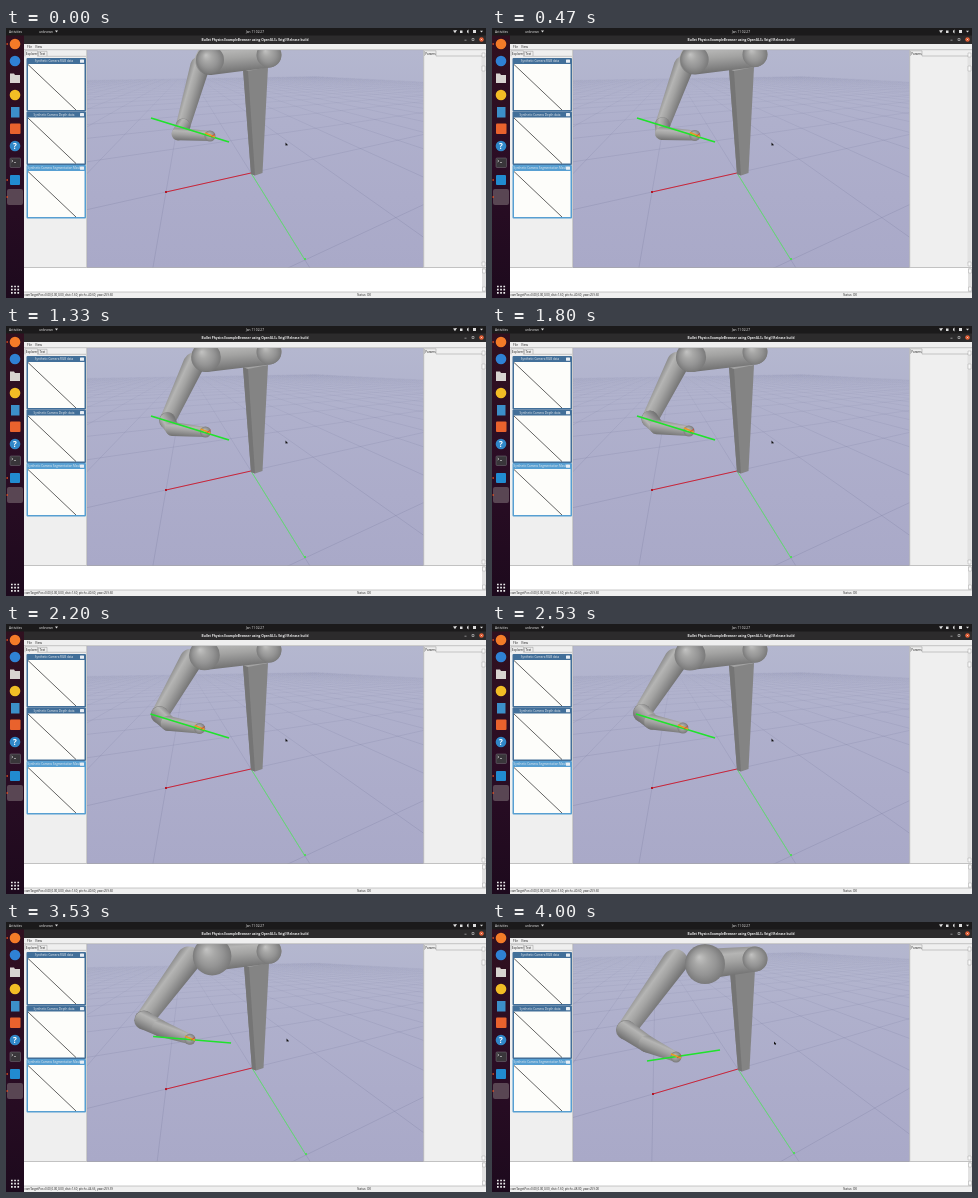
Animation, 480 px wide and 270 px high, one loop 4.07 s. Source, as an HTML page with a canvas:

```html
<!DOCTYPE html>
<html lang="en">
<head>
<meta charset="utf-8">
<title>Robot arm simulation</title>
<style>
  html, body { margin: 0; width: 100%; height: 100%; overflow: hidden; background: #efefef; }
  canvas, svg { position: absolute; left: 0; top: 0; width: 480px; height: 270px; }
  text { font: 3.2px "Open Sans", "Noto Sans", sans-serif; fill: #222; }
  .light text { fill: #eee; }
  .title { font-weight: 700; }
  .mid { text-anchor: middle; }
</style>
</head>
<body>
<canvas id="view" width="480" height="270"></canvas>
<svg viewBox="0 0 480 270">
  <!-- side panels, log and status bar -->
  <path fill="#efefef" d="M18 16H480V22H18zM18 22H81V240H18zM417.500 22H480V240H417.500zM18 264H480V270H18z"/>
  <path fill="#fff" d="M18 240H476V264H18z"/>
  <path fill="#e2e2e2" d="M476 240h4v24h-4zM475.500 27h4v209h-4z"/>
  <path fill="none" stroke="#a5a5a5" stroke-width=".6" d="M18 239.500H480M18 264H480M18 21.700H480M80.700 22V239M417.700 22V239M19 28.300V22.800H31.500V28.300H80M32.500 28V23.300H41V28M418.500 28V22.800H430V28H479"/>
  <path fill="#f8f8f8" stroke="#aaa" stroke-width=".5" d="M476 25h3v4h-3zM476 38h3v5h-3zM476 234h3v4h-3zM476.500 241h3v4h-3zM476.500 259h3v4h-3z"/>
  <text x="21" y="19.800">File</text>
  <text x="29" y="19.800">View</text>
  <text x="19.800" y="26.600" style="font-size:3px">Explorer</text>
  <text x="33.500" y="26.600" style="font-size:3px">Test</text>
  <text x="419.200" y="26.600" style="font-size:3px">Params</text>
  <text id="status" x="18.500" y="268.200" style="font-size:2.900px"></text>
  <text x="351" y="268.200" style="font-size:2.900px">Status: OK</text>

  <!-- camera windows -->
  <g id="cams" class="light"></g>

  <!-- desktop bars -->
  <path fill="#1b1a1b" d="M0 0H480V8H0z"/>
  <path fill="#2c2b2c" d="M18 7.500H480V16H18z"/>
  <g class="light">
    <text x="3" y="4.500">Activities</text>
    <text x="33" y="4.500">unknown</text>
    <path fill="#ddd" d="M49 2.600h3l-1.500 1.800z"/>
    <text class="mid" x="249" y="4.500">Jan 11 02:27</text>
    <text class="mid title" x="249" y="12.700">Bullet Physics ExampleBrowser using OpenGL3+ [btgl] Release build</text>
    <path fill="#ddd" d="M447 2.500l4-.5-2 3.200zM454 2.500h2.500v2.500h-2.500zM461 2.700l1.500-1.200v4l-1.500-1.200zM467 2h3v3h-3zM474 2.700h3l-1.500 1.800z"/>
    <path fill="none" stroke="#ccc" stroke-width=".6" d="M458.500 12.200h2M466 10.500h2v2h-2z"/>
    <circle cx="475.500" cy="11.500" r="2.300" fill="#e05a30"/>
    <path stroke="#fff" stroke-width=".5" d="M474.700 10.700l1.600 1.600M476.300 10.700l-1.600 1.600"/>
  </g>

  <!-- dock -->
  <path fill="url(#dockFill)" d="M0 7.500H18V270H0z"/>
  <defs>
    <linearGradient id="dockFill" x2="0" y2="1">
      <stop stop-color="#30101f"/><stop offset=".5" stop-color="#2b0d25"/><stop offset="1" stop-color="#1d0a1d"/>
    </linearGradient>
  </defs>
  <rect x="1" y="161" width="16" height="16" rx="2" fill="#594653"/>
  <circle cx="9" cy="16" r="5.300" fill="#f47b28"/>
  <circle cx="9" cy="33" r="5.300" fill="#2f81d4"/>
  <path fill="#d8d4d0" d="M4 45.500h4l1 1.500h5v8H4z"/>
  <circle cx="9" cy="67" r="5.300" fill="#f2bd25"/>
  <rect x="5" y="79" width="8.500" height="10.500" fill="#3c8fc9"/>
  <rect x="4" y="95.500" width="10.500" height="10.500" rx="1" fill="#e9622d"/>
  <circle cx="9" cy="118" r="5.300" fill="#3087c8"/>
  <text class="mid" x="9" y="121" style="font-size:8px;font-weight:700;fill:#fff">?</text>
  <rect x="4" y="130" width="10.500" height="9.500" rx="1" fill="#39363a" stroke="#77717a" stroke-width=".5"/>
  <path fill="none" stroke="#ddd" stroke-width=".6" d="M5.500 132l1.500 1-1.500 1M8 134.500h2"/>
  <rect x="4" y="147" width="10" height="10" rx="1" fill="#218bd0"/>
  <path fill="#e95420" d="M.5 15.300h1.400v1.400H.5zM.5 151.300h1.400v1.400H.5zM.5 168.300h1.400v1.400H.5z"/>
  <path stroke="#eee" stroke-width="1.700" stroke-dasharray="1.700 1.500" d="M5 258.500h8.200M5 261.700h8.200M5 264.900h8.200"/>
</svg>
<script>
const ctx = document.getElementById("view").getContext("2d");
const status = document.getElementById("status");
const LOOP = 4070, STEP = 200 / 3;

const titles = ["RGB data", "Depth data", "Segmentation Mask"];
document.getElementById("cams").innerHTML = titles.map((name, i) => {
  const y = 30 + i * 53.500, color = i == 2 ? "#579fd2" : "#426f99";
  return `<rect x="20.500" y="${y}" width="59.500" height="53.500" rx="1" fill="${color}"/>
    <rect x="22" y="${y + 6}" width="56.500" height="46" fill="#fdfdfa"/>
    <path d="M22 ${y + 6.500}L70 ${y + 52}" stroke="#222" stroke-width=".7"/>
    <text class="mid" x="48" y="${y + 4.200}" style="font-size:3px">Synthetic Camera ${name}</text>
    <rect x="74" y="${y + 1.500}" width="4" height="3.200" rx=".5" fill="#e8eef4"/>`;
}).join("");

// time, then x,y of: shoulder, forearm top, elbow, wrist, tool, marker start, marker end
const poses = [
  [0, 204, 32, 194, 38, 177, 98, 172, 106, 204, 108, 145, 90, 223, 114],
  [870, 201, 31, 190, 38, 165, 96, 168, 105, 202, 107, 145, 90, 223, 114],
  [1800, 199, 31, 186, 37, 158, 93, 165, 101, 197, 105, 145, 90, 223, 114],
  [2530, 198, 31, 184, 36, 150, 89, 160, 98, 191, 104, 144, 90, 223, 114],
  [3070, 198, 32, 183, 35, 144, 85, 157, 95, 188, 102, 143, 90, 223, 114],
  [3270, 199, 32, 183, 35, 142, 85, 156, 95, 187, 102, 143, 91, 223, 114],
  [3530, 206, 34, 183, 37, 138, 98, 154, 106, 184, 117, 147, 114, 225, 121],
  [3730, 213, 41, 183, 39, 136, 107, 155, 120, 184, 134, 155, 138, 228, 128],
  [4000, 213, 42, 183, 40, 134, 108, 155, 122, 184, 135, 155, 139, 228, 128]
];

// time, then x,y of: origin, red end, green end; horizon, pillar top, pitch, yaw, pointer x,y
const cameras = [
  [3270, 245, 145, 160, 164, 299, 232, 42, 39, -40.6, 259.6, 279.5, 114.5],
  [3530, 246, 146, 160, 167, 300, 233, 34, 41, -44.6, 259.4, 280.5, 116.5],
  [3730, 246, 147, 161, 172, 302, 232, 22, 47, -48, 259, 282, 119.5]
];

function sample(keys, t) {
  const last = keys[keys.length - 1];
  if (t <= keys[0][0]) return keys[0].slice(1);
  if (t >= last[0]) return last.slice(1);
  const i = keys.findIndex(k => k[0] > t), a = keys[i - 1], b = keys[i];
  const f = (t - a[0]) / (b[0] - a[0]);
  return a.slice(1).map((v, j) => v + (b[j + 1] - v) * f);
}

const pairs = (list, n) => Array.from({ length: n }, (_, i) => [list[2 * i], list[2 * i + 1]]);

function shade(gradient, ...colors) {
  colors.forEach((c, i) => gradient.addColorStop(i / (colors.length - 1), c));
  return gradient;
}

function line(a, b, color, width) {
  ctx.beginPath();
  ctx.moveTo(...a);
  ctx.lineTo(...b);
  ctx.strokeStyle = color;
  ctx.lineWidth = width;
  ctx.stroke();
}

function poly(points, color) {
  ctx.beginPath();
  points.forEach(p => ctx.lineTo(...p));
  ctx.fillStyle = color;
  ctx.fill();
}

function tube(a, b, ra, rb) {
  const angle = Math.atan2(b[1] - a[1], b[0] - a[0]), q = Math.PI / 2;
  let nx = -Math.sin(angle), ny = Math.cos(angle);
  if (nx + ny > 0) { nx = -nx; ny = -ny; }
  const r = Math.max(ra, rb);
  ctx.beginPath();
  ctx.arc(...a, ra, angle + q, angle + 3 * q);
  ctx.arc(...b, rb, angle - q, angle + q);
  ctx.closePath();
  ctx.fillStyle = shade(
    ctx.createLinearGradient(a[0] + nx * r, a[1] + ny * r, a[0] - nx * r, a[1] - ny * r),
    "#8d8d8d", "#b5b5b4", "#a3a3a2", "#8a8a8a", "#707070");
  ctx.fill();
}

function ball([x, y], r) {
  ctx.beginPath();
  ctx.arc(x, y, r, 0, 7);
  ctx.fillStyle = shade(ctx.createRadialGradient(x - r * .3, y - r * .35, 0, x, y, r),
    "#c3c3c2", "#a8a8a7", "#949494", "#7a7a7a");
  ctx.fill();
}

function drawGround([o, red, green], horizon) {
  const weight = p => (o[1] - horizon) / (p[1] - horizon);
  const wr = weight(red), wg = weight(green);
  const project = (u, v) => {
    const w = 1 + u * (wr - 1) + v * (wg - 1);
    return [0, 1].map(i => (o[i] * (1 - u - v) + u * (red[i] * wr) + v * (green[i] * wg)
      + (u + v) * 0) / w);
  };
  const stroke = shade(ctx.createLinearGradient(0, horizon, 0, 240),
    "rgba(105,108,145,.04)", "rgba(105,108,145,.25)", "rgba(105,108,145,.34)", "rgba(105,108,145,.36)");
  const far = -24;
  for (let i = far; i <= 14; i++) {
    const vMax = (.9 + i * (wr - 1)) / (1 - wg);
    const uMax = (.9 + i * (wg - 1)) / (1 - wr);
    if (vMax > far) line(project(i, far), project(i, vMax), stroke, .6);
    if (uMax > far) line(project(far, i), project(uMax, i), stroke, .6);
  }
  line(o, red, "#cb2438", 1);
  line(o, green, "#63dc72", 1);
  ctx.fillStyle = "#b01828";
  ctx.fillRect(red[0] - 1, red[1] - 1, 2, 2);
  ctx.fillStyle = "#52d85c";
  ctx.fillRect(green[0] - 1, green[1] - 2, 2, 2);
}

function drawPillar([x, y], top) {
  poly([[x - 8, top + 2], [x + 17, top], [x + 11.500, y], [x + 4, y + 2.500], [x, y + 1]], "#848484");
  poly([[x - 8, top + 2], [x - 3, top + 4], [x + 4, y + 2.500], [x, y + 1]], "#757575");
  poly([[x - 8, top + 2], [x + 5, top - 2], [x + 17, top], [x - 3, top + 4]], "#a2a2a2");
}

function drawArm([shoulder, top, elbow, wrist, tool, from, to], t) {
  const k = .75 + t / 16000;
  const base = [263, shoulder[1] - 5];
  tube(top, elbow, 13 * k, 9.500 * k);
  tube(shoulder, base, 15, 12.500);
  ball(base, 12.500);
  ball(shoulder, 14 + 6 * (k - .75) * 4 * (t > 3270 ? 1 : .4));
  ball(elbow, 10 * k);
  tube(elbow, wrist, 9.500 * k, 8.500 * k);
  tube(wrist, tool, 8.500 * k, 5);
  ball(tool, 5.500);
  line(from, to, "#1fe32b", 1.500);
  line([tool[0] - 5, tool[1] - 3], [tool[0] + 5, tool[1] + 1], "#e79a25", 1.600);
  line([tool[0] + 1, tool[1] + 1], [tool[0] + 5, tool[1] - 2], "#d8402c", .8);
}

function draw(t) {
  const cam = sample(cameras, t), axes = pairs(cam, 3);
  const [horizon, pillarTop, pitch, yaw, px, py] = cam.slice(6);
  ctx.save();
  ctx.beginPath();
  ctx.rect(81, 22, 336.500, 217.500);
  ctx.clip();
  ctx.fillStyle = shade(ctx.createLinearGradient(0, 22, 0, 240), "#b4b7cf", "#afb0cc", "#acacca", "#a9a9c8");
  ctx.fillRect(81, 22, 337, 218);
  drawGround(axes, horizon);
  drawPillar(axes[0], pillarTop);
  drawArm(pairs(sample(poses, t), 7), t);
  poly([[px, py], [px, py + 3.200], [px + .8, py + 2.500], [px + 1.500, py + 3.600], [px + 2.200, py + 2.300]], "#111");
  ctx.restore();
  status.textContent = "camTargetPos=0.00,0.00,0.00, dist=1.60, pitch=" + pitch.toFixed(2) + ", yaw=" + yaw.toFixed(2);
}

const start = performance.now();
function tick() {
  const t = (performance.now() - start) % LOOP;
  draw(Math.floor((t + 4) / STEP) % 61 * STEP);
  requestAnimationFrame(tick);
}
tick();
</script>
</body>
</html>
```
